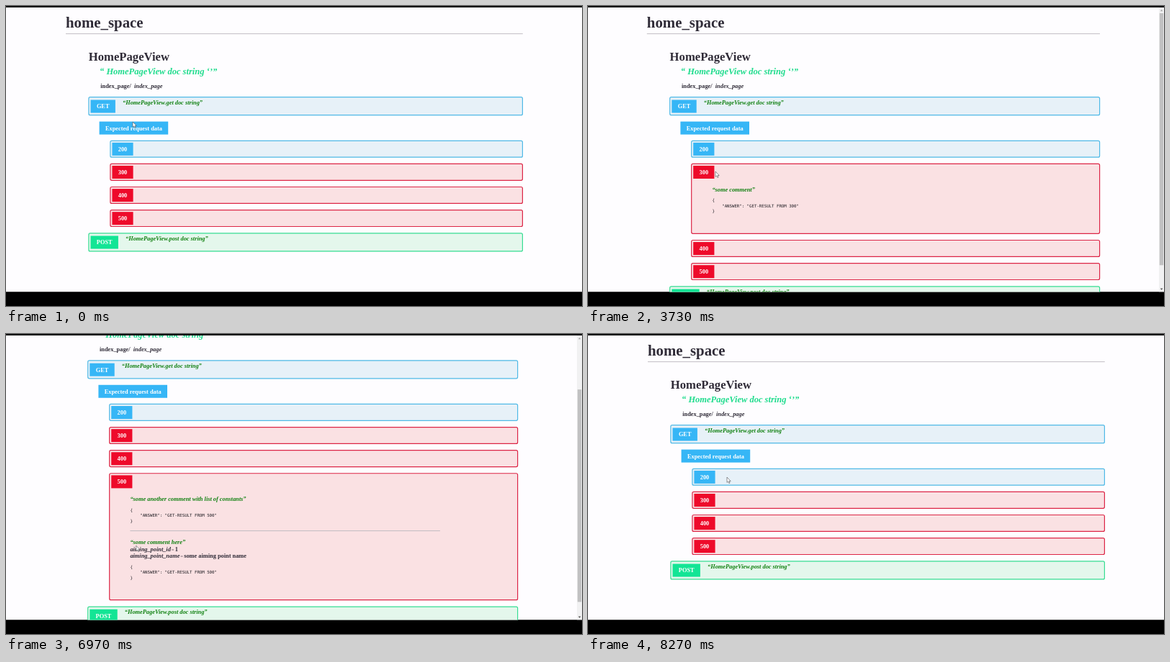
An HTML page that plays this animation: 800 px wide and 417 px high, repeating every 8300 ms.

```html
<!DOCTYPE html>
<html lang="en">
<head>
<meta charset="utf-8">
<title>API docs</title>
<style>
  html, body { margin: 0; width: 100%; height: 100%; overflow: hidden; background: #000; }
  svg { display: block; width: 100vw; height: 100vh; }
  text { font: bold 8.33px "Liberation Serif", "Times New Roman", serif; fill: #302c38; white-space: pre; }
  .h1 { font-size: 20.83px; }
  .h2 { font-size: 16.67px; }
  .doc { font-size: 12.5px; font-style: italic; fill: #1fdc8d; }
  .note { font-style: italic; fill: #108010; }
  .it { font-style: italic; }
  .eq { font-size: 6.5px; font-weight: normal; }
  .btn { fill: #fff; text-anchor: middle; }
  .code { font: 5.72px "DejaVu Sans Mono", monospace; fill: #1c1a20; }
</style>
</head>
<body>
<svg viewBox="0 0 800 417" preserveAspectRatio="none">
  <defs><clipPath id="view"><rect y="2" width="800" height="395.5"/></clipPath></defs>
  <rect width="800" height="417" fill="#000"/>
  <g clip-path="url(#view)">
    <rect y="2" width="800" height="395.5" fill="#fefdff"/>
    <g id="page"></g>
    <g id="bar">
      <rect x="793" y="2" width="7" height="395.5" fill="#f1f1f2"/>
      <rect id="thumb" x="793.8" width="5.4" fill="#c1c1c2"/>
      <path d="M794.8 7.2h3.6l-1.8-2.2z" fill="#a3a3a3"/>
      <path d="M794.8 392.6h3.6l-1.8 2.2z" fill="#505050"/>
    </g>
    <path id="cursor" d="M0 0V7.4L1.7 5.9L2.9 8.5L4.1 8L3 5.5H5.2Z" fill="#fff" stroke="#4a4a50" stroke-width=".6"/>
  </g>
</svg>
<script>
const LOOP = 8300;
const VIEW = 395, TRACK = 376, SCROLL = 108;
const BLUE = { fill: '#e7f1f8', line: '#4fb9e6', btn: '#36b6f6' };
const RED = { fill: '#fae1e3', line: '#dc2546', btn: '#ee0a2a' };
const GREEN = { fill: '#e4f7ec', line: '#36dd92', btn: '#13e595' };

// Extra height of each section while open
const GROW = { data: 64, 200: 64, 300: 74, 400: 74, 500: 153 };
// [section, opened at, closed at]
const OPEN = [['data', 210, 1520], ['200', 2210, 2850], ['300', 3390, 4060],
              ['400', 4610, 5270], ['500', 5730, 7550]];
// Pointer moves: [start, end, x, y]
const MOVES = [[640, 790, 206, 163], [1550, 1850, 176, 196.5], [2900, 3240, 177, 230],
               [4100, 4450, 177, 263.5], [5300, 5640, 180, 304], [6740, 7080, 181, 291],
               [7650, 8260, 193, 199]];

const $ = id => document.getElementById(id);
const text = (x, y, s, cls = '') => `<text x="${x}" y="${y}" class="${cls}">${s}</text>`;
const rule = (x1, x2, y) => `<path d="M${x1} ${y}H${x2}" stroke="#bcb8bf" stroke-width=".9"/>`;

function button(x, y, w, label, color) {
  return `<rect x="${x}" y="${y}" width="${w}" height="18" fill="${color}"/>` +
    text(x + w / 2, y + 11.9, label, 'btn');
}

function panel(x, y, right, h, c) {
  return `<rect x="${x}" y="${y}" width="${right - x}" height="${h}" rx="2"
    fill="${c.fill}" stroke="${c.line}" stroke-width="1.2"/>`;
}

function json(x, y, answer) {
  return text(x, y, '{', 'code') +
    text(x + 13.8, y + 7.4, `"ANSWER": "${answer}"`, 'code') +
    text(x, y + 14.9, '}', 'code');
}

function param(x, y, name, value) {
  return `<text x="${x}" y="${y}"><tspan class="it">${name}</tspan>` +
    `<tspan class="eq" dx="1">=</tspan><tspan dx="1.2">${value}</tspan></text>`;
}

// Contents of an open section; y is the top of its panel
const BODY = {
  200: (x, y) => json(x, y + 43.4, 'GET-RESULT'),
  300: (x, y) => text(x, y + 38.2, '“some comment”', 'note') + json(x, y + 52.9, 'GET-RESULT FROM 300'),
  400: (x, y) => param(x, y + 38.2, 'aiming_point_id', 1) + json(x, y + 52.9, 'GET-RESULT FROM 400'),
  500: (x, y) => text(x, y + 38.2, '“some another comment with list of constants”', 'note') +
    json(x, y + 52.9, 'GET-RESULT FROM 500') +
    rule(x, x + 430.5, y + 79.8) +
    text(x, y + 98.4, '“some comment here”', 'note') +
    param(x, y + 107.9, 'aiming_point_id', 1) +
    param(x, y + 117.4, 'aiming_point_name', 'some aiming point name') +
    json(x, y + 132.1, 'GET-RESULT FROM 500')
};

function buildPage(open) {
  const dx = open ? -1.2 : 0;
  const right = open ? 710.6 : 717.4;
  let out = text(83 + dx, 30, 'home_space', 'h1') + rule(83 + dx, right + .4, 38.6) +
    text(114.8 + dx, 75.6, 'HomePageView', 'h2') +
    text(130 + dx, 95, '“ HomePageView doc string ‘’”', 'doc') +
    text(131.2 + dx, 114, 'index_page/') + text(178 + dx, 114, 'index_page', 'it') +
    panel(114.9 + dx, 126.7, right, 25, BLUE) +
    button(117.5 + dx, 130.5, 34.4, 'GET', BLUE.btn) +
    text(162 + dx, 136.8, '“HomePageView.get doc string”', 'note') +
    button(129.6 + dx, 160.6, 95.6, 'Expected request data', BLUE.btn);

  let y = 187.3 + (open === 'data' ? GROW.data : 0);
  for (const code of ['200', '300', '400', '500']) {
    const c = code === '200' ? BLUE : RED;
    const grow = open === code ? GROW[code] : 0;
    out += panel(144.9 + dx, y, right, 22.9 + grow, c) +
      button(147.4 + dx, y + 2.6, 29.2, code, c.btn);
    if (grow) out += BODY[code](173.6 + dx, y);
    y += 32.1 + grow;
  }
  return out + panel(114.9 + dx, y + .2, right, 25, GREEN) +
    button(117.5 + dx, y + 3.8, 38.4, 'POST', GREEN.btn) +
    text(166 + dx, y + 10.2, '“HomePageView.post doc string”', 'note');
}

const clamp = v => Math.min(1, Math.max(0, v));
const smooth = v => v * v * (3 - 2 * v);
const ease = (t, a, b) => smooth(clamp((t - a) / (b - a)));

let shown;
function render(t) {
  const section = OPEN.find(([, a, b]) => t >= a && t < b);
  const open = section ? section[0] : '';
  if (open !== shown) {
    $('page').innerHTML = buildPage(open);
    shown = open;
  }

  const scroll = SCROLL * (ease(t, 6690, 7070) - ease(t, 7170, 7520));
  $('page').setAttribute('transform', `translate(0 ${-scroll})`);
  $('bar').style.display = open ? '' : 'none';
  if (open) {
    const ratio = TRACK / (350 + GROW[open]);
    $('thumb').setAttribute('y', 10 + scroll * ratio);
    $('thumb').setAttribute('height', VIEW * ratio);
  }

  let x = 176, y = 161;
  for (const [a, b, tx, ty] of MOVES) {
    const k = ease(t, a, b);
    x += (tx - x) * k;
    y += (ty - y) * k;
  }
  $('cursor').setAttribute('transform', `translate(${x} ${y})`);
}

const start = performance.now();
function tick() {
  render((performance.now() - start) % LOOP);
  requestAnimationFrame(tick);
}
tick();
</script>
</body>
</html>
```
